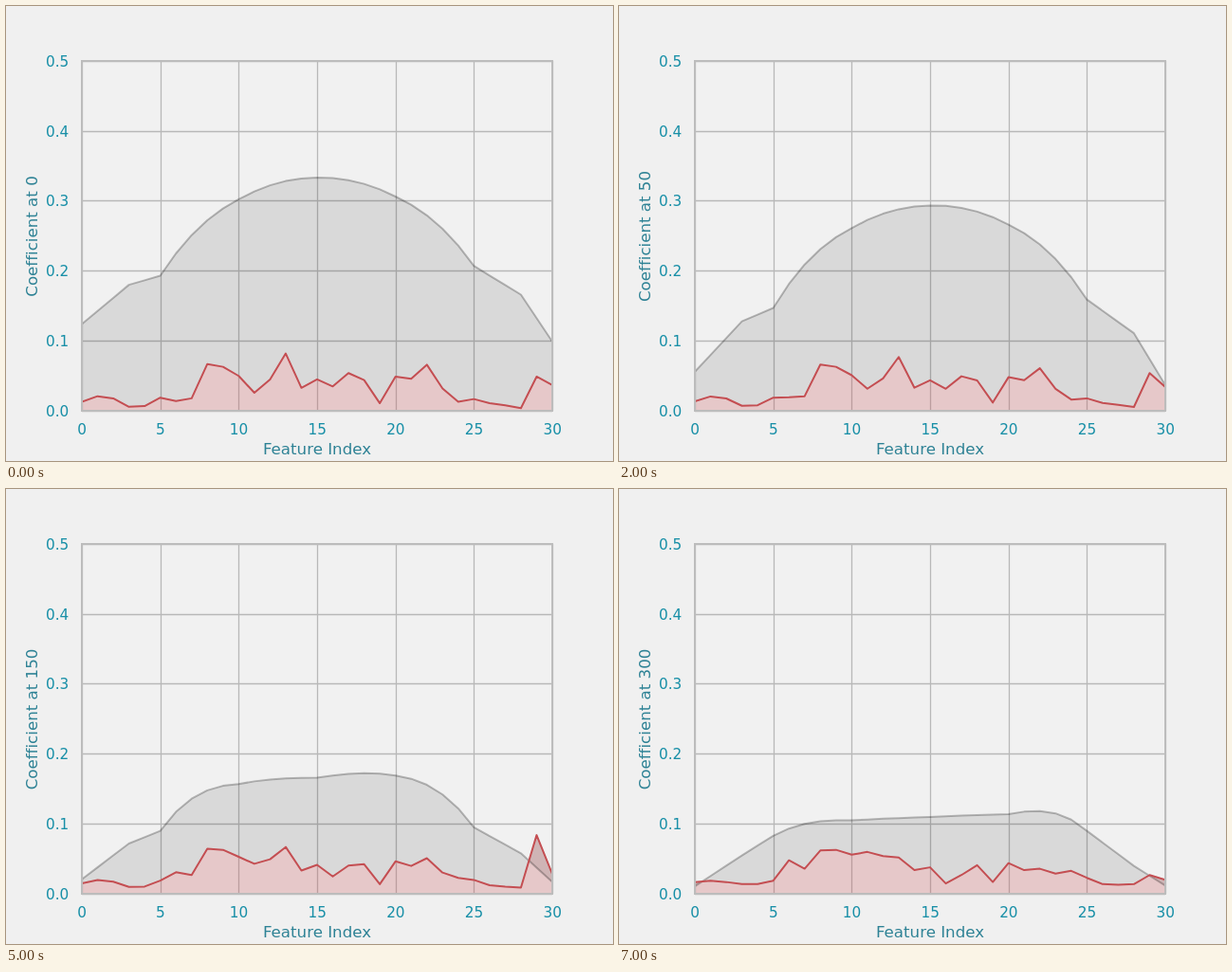
Write an HTML page that moves like this. It is 640 by 480 pixels and loops after 8000 ms.

```html
<!DOCTYPE html>
<html lang="en">
<head>
<meta charset="utf-8">
<title>Coefficients by feature index</title>
<style>
  html, body { margin: 0; width: 100%; height: 100%; overflow: hidden; background: #f0f0f0; }
  svg { display: block; width: 640px; height: 480px; }
  text { font-family: "DejaVu Sans", sans-serif; font-variant-ligatures: none; }
  .tick { font-size: 15.28px; fill: #188fa7; }
  .name { font-size: 16.67px; fill: #2e8295; text-anchor: middle; }
  .grid { stroke: #b8b8b8; stroke-width: 1.3; fill: none; }
</style>
</head>
<body>
<svg viewBox="0 0 640 480">
  <defs><clipPath id="plot"><rect x="80" y="57.6" width="496" height="369.6"/></clipPath></defs>
  <rect x="80" y="58" width="496" height="369" fill="#f1f1f1"/>
  <g id="axes"></g>
  <g clip-path="url(#plot)" stroke-linejoin="round">
    <path id="redArea" fill="#c44e52" fill-opacity=".25"/>
    <path id="band" fill="#000" fill-opacity=".1"/>
    <path id="grayLine" fill="none" stroke="#000" stroke-opacity=".26" stroke-width="2"/>
    <path id="redLine" fill="none" stroke="#c44e52" stroke-width="2"/>
  </g>
  <rect x="80" y="58" width="496" height="369" fill="none" stroke="#bcbcbc" stroke-width="2"/>
  <text class="name" x="328" y="473">Feature Index</text>
  <text class="name" id="label" transform="translate(33 243) rotate(-90)"></text>
</svg>
<script>
const STEP = 1000;
const COUNTS = [0, 25, 50, 75, 100, 150, 200, 300];
const FEATURES = Array.from({ length: 31 }, (_, i) => i);
const SPIKE = 29; // the one feature that jumps on its own

const $ = id => document.getElementById(id);
const px = i => 80 + i * 496 / 30;
const py = v => 427.2 - v * 0.7392; // v in thousandths
const lerp = (a, b, p) => a + (b - a) * p;

function add(tag, attrs, text = '') {
  const el = document.createElementNS('http://www.w3.org/2000/svg', tag);
  for (const key in attrs) el.setAttribute(key, attrs[key]);
  el.textContent = text;
  $('axes').append(el);
}

for (let i = 0; i <= 30; i += 5) {
  add('path', { class: 'grid', d: `M${Math.round(px(i)) + 0.5} 58V427` });
  add('text', { class: 'tick', x: px(i) + 0.2, y: 452, 'text-anchor': 'middle' }, i);
}
for (let v = 0; v <= 500; v += 100) {
  add('path', { class: 'grid', d: `M80 ${Math.round(py(v)) + 0.5}H576` });
  add('text', { class: 'tick', x: 66.3, y: Math.round(py(v) + 6), 'text-anchor': 'end' }, (v / 1000).toFixed(1));
}

// Key heights of the gray curve: straight flanks outside 5..25, a cubic dome inside.
const KNOTS = [0, 3, 5, 7, 10, 15, 20, 23, 25, 28, 30];
const KEYS = [
  { at: 0, spike: 49, gray: [124, 180, 193, 251, 302, 333, 306, 260, 207, 166, 99] },
  { at: 50, spike: 54, gray: [56, 128, 147, 209, 261, 293, 266, 217, 159, 111, 37] },
  { at: 75, spike: 30, gray: [31, 92, 122, 189, 243, 275, 245, 191, 126, 76, 25] },
  { at: 100, spike: 49, gray: [27, 79, 99, 162, 220, 253, 221, 164, 105, 65, 21] },
  { at: 150, spike: 84, gray: [21, 72, 90, 136, 157, 166, 169, 142, 95, 58, 17] },
  { at: 300, spike: 27, gray: [11, 55, 83, 100, 105, 110, 114, 115, 90, 40, 12] },
];

// The red profile drifts evenly from the first shape to the second.
const RED_START = [13, 21, 18, 6, 7, 19, 14, 18, 67, 63, 50, 26, 45, 82, 33, 45, 35, 54, 44, 11, 49, 46, 66, 32, 13, 17, 11, 8, 4, 0, 37];
const RED_END = [17, 19, 17, 14, 14, 19, 48, 36, 62, 63, 56, 60, 54, 52, 34, 38, 15, 27, 41, 17, 44, 34, 36, 29, 33, 23, 14, 13, 14, 0, 20];

// Lagrange polynomial through the knots in [first, first + count).
function poly(x, values, first, count) {
  const near = Array.from({ length: count }, (_, n) => first + n);
  return near.reduce((sum, a) => sum + near.reduce((w, b) =>
    a === b ? w : w * (x - KNOTS[b]) / (KNOTS[a] - KNOTS[b]), values[a]), 0);
}

function grayAt(x, values) {
  const next = KNOTS.findIndex(k => k >= x);
  return x > 5 && x < 25
    ? poly(x, values, Math.min(5, Math.max(2, next - 2)), 4)
    : poly(x, values, Math.max(0, next - 1), 2);
}

function sample(at) {
  const next = Math.max(1, KEYS.findIndex(k => k.at >= at));
  const a = KEYS[next - 1], b = KEYS[next];
  const p = (at - a.at) / (b.at - a.at);
  const heights = a.gray.map((v, i) => lerp(v, b.gray[i], p));
  return {
    gray: FEATURES.map(i => grayAt(i, heights)),
    red: FEATURES.map(i => i === SPIKE ? lerp(a.spike, b.spike, p) : lerp(RED_START[i], RED_END[i], at / 300)),
  };
}

const points = values => values.map((v, i) => `${px(i).toFixed(2)} ${py(v).toFixed(2)}`);

function draw(at) {
  const { gray, red } = sample(at);
  const g = points(gray), r = points(red);
  $('redArea').setAttribute('d', `M80 427.2L${r.join('L')}L576 427.2Z`);
  $('band').setAttribute('d', `M${g.join('L')}L${[...r].reverse().join('L')}Z`);
  $('grayLine').setAttribute('d', `M${g.join('L')}`);
  $('redLine').setAttribute('d', `M${r.join('L')}`);
  $('label').textContent = `Coefficient at ${at}`;
}

let shown = 0;
const begin = performance.now();
draw(COUNTS[0]);

function tick() {
  const step = Math.floor((performance.now() - begin) / STEP) % COUNTS.length;
  if (step !== shown) draw(COUNTS[shown = step]);
  requestAnimationFrame(tick);
}
requestAnimationFrame(tick);
</script>
</body>
</html>
```
